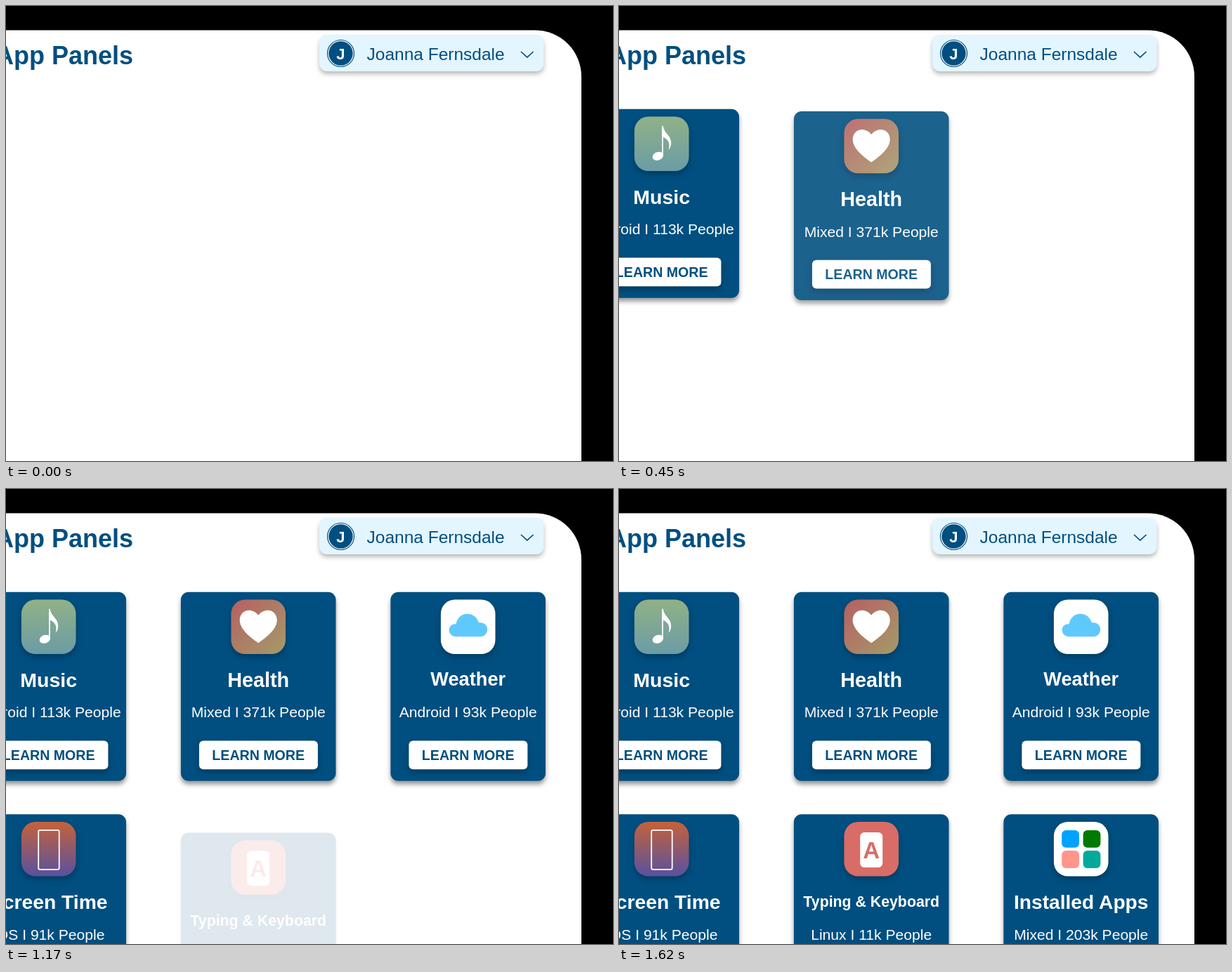
These frames come from a looping animation (864 by 648 pixels, 2100 ms). An HTML page:

```html
<!DOCTYPE html>
<html lang="en">
<head>
<meta charset="utf-8">
<title>App Panels</title>
<style>
  html, body { margin: 0; width: 100%; height: 100%; overflow: hidden; background: #000; }
  svg { display: block; width: 864px; height: 648px; font-family: "Liberation Sans", Arial, sans-serif; }
  .mid { text-anchor: middle; }
  .bold { font-weight: bold; }
  .navy { fill: #004f80; }
  .white { fill: #fff; }
  .pill { fill: #e3f5ff; filter: drop-shadow(0 4px 3px #0004); }
  .panel { filter: drop-shadow(0 5px 3px #0006); }
  .raised { filter: drop-shadow(0 4px 4px #0004); }
</style>
</head>
<body>
<svg viewBox="0 0 864 648">
  <defs>
    <linearGradient id="music" x2="0" y2="1"><stop stop-color="#90b186"/><stop offset="1" stop-color="#6b9ca6"/></linearGradient>
    <linearGradient id="health" x2="1" y2="1"><stop stop-color="#b75f62"/><stop offset="1" stop-color="#a29c6a"/></linearGradient>
    <linearGradient id="screen" x2="0" y2="1"><stop stop-color="#c5623a"/><stop offset="1" stop-color="#5851a0"/></linearGradient>
  </defs>
  <rect class="white" x="-200" y="34.5" width="1019" height="900" rx="66"/>
  <text class="bold navy" x="181" y="83" font-size="36" text-anchor="end">App Panels</text>
  <rect class="pill" x="446" y="41" width="319.5" height="52" rx="11"/>
  <circle cx="476.5" cy="67.5" r="19" fill="#fff" stroke="#004f80" stroke-width="1.2"/>
  <circle class="navy" cx="476.5" cy="67.5" r="17.2"/>
  <text class="bold white mid" x="476.3" y="75.5" font-size="22">J</text>
  <text class="navy" x="513.5" y="77.2" font-size="24.5">Joanna Fernsdale</text>
  <path d="M733 65L741.8 73.2L750.6 65" fill="none" stroke="#004f80" stroke-width="1.7"/>
  <g id="cards"></g>
</svg>
<script>
const LOOP = 2100, STEP = 30, FIRST = 90, GAP = 270, LEAD = 21.6, DURATION = 183, RISE = 30;

const tile = (x, y, color) =>
  `<rect x="${x}" y="${y}" width="24.8" height="24.8" rx="6" fill="${color}"/>`;

// Card coordinates: x = 0 is the centre line, y = 0 the top edge.
const cards = [
  { title: 'Music', size: 28.5, base: 135, info: 'Android I 113k People', back: 'url(#music)',
    icon: `<g class="white"><ellipse cx="-5.3" cy="67" rx="8" ry="5.8" transform="rotate(-20 -5.3 67)"/>
      <path d="M.3 24H2.2C3 35 14 37 13.5 49C13.3 53 12 56 10 58C12.5 48 9 43 2.2 40V67H.3Z"/></g>` },
  { title: 'Health', size: 28.8, base: 135, info: 'Mixed I 371k People', back: 'url(#health)',
    icon: `<path class="white" d="M0 33C-4 28-9 26-13 26C-21 26-26.5 32-26.5 40C-26.5 53-12 64 0 72.5
      C12 64 26.5 53 26.5 40C26.5 32 21 26 13 26C9 26 4 28 0 33Z"/>` },
  { title: 'Weather', size: 27.2, base: 133, info: 'Android I 93k People', back: '#fff',
    icon: `<path fill="#5fc9fd" d="M-17 63.5C-23 63.5-27 59-27 54C-27 48-22 45-17 45.5C-16 37-9 31-1 31
      C7 31 13 36 15 43.5C22 42.5 27.5 47 27.5 53C27.5 59 23 63.5 18 63.5Z"/>` },
  { title: 'Screen Time', size: 28.3, base: 135, info: '\u00a0OS I 91k People', back: 'url(#screen)',
    icon: `<rect x="-14.5" y="22.5" width="29.5" height="56" rx="2" fill="none" stroke="#fff" stroke-width="1.8"/>` },
  { title: 'Typing & Keyboard', size: 21.3, base: 132, info: 'Linux I 11k People', back: '#d96c67',
    icon: `<rect class="white" x="-16" y="25.7" width="32" height="50" rx="6"/>
      <text class="bold mid" y="62.5" font-size="33" fill="#d96c67">A</text>` },
  { title: 'Installed Apps', size: 28.2, base: 135, info: 'Mixed I 203k People', back: '#fff',
    icon: tile(-27.5, 22.7, '#00a3ff') + tile(2.9, 22.7, '#007a00') +
      tile(-27.5, 51.8, '#ff968d') + tile(2.9, 51.8, '#00aa9b') }
];

const cardMarkup = ({ title, size, base, info, back, icon }) => `<g>
  <rect class="panel navy" x="-110.3" width="220.6" height="269" rx="11"/>
  <rect class="raised" x="-38.8" y="10.8" width="77.6" height="77.4" rx="20" fill="${back}"/>${icon}
  <text class="bold white mid" y="${base}" font-size="${size}">${title.replace('&', '&amp;')}</text>
  <text class="white mid" y="178.5" font-size="21.1">${info}</text>
  <rect class="raised white" x="-84.3" y="211.7" width="169" height="40.7" rx="6"/>
  <text class="bold navy mid" y="239" font-size="19.6">LEARN MORE</text></g>`;

const layer = document.getElementById('cards');
layer.innerHTML = cards.map(cardMarkup).join('');

// cubic-bezier(.25, .1, .25, 1)
function ease(x) {
  if (x <= 0) return 0;
  if (x >= 1) return 1;
  let low = 0, high = 1, s;
  for (let i = 0; i < 24; i++) {
    s = (low + high) / 2;
    if (0.75 * s * (1 - s) + s ** 3 < x) low = s; else high = s;
  }
  return 0.3 * s * (1 - s) ** 2 + 3 * s * s * (1 - s) + s ** 3;
}

function draw() {
  const time = Math.floor(performance.now() % LOOP / STEP) * STEP;
  [...layer.children].forEach((card, i) => {
    const p = ease((time - FIRST - i * GAP + LEAD) / DURATION);
    const x = 60.7 + i % 3 * 298.5;
    const y = 146.8 + Math.floor(i / 3) * 316.5 + RISE * (1 - p);
    card.setAttribute('transform', `translate(${x} ${y})`);
    card.setAttribute('opacity', p);
  });
  requestAnimationFrame(draw);
}
draw();
</script>
</body>
</html>
```
